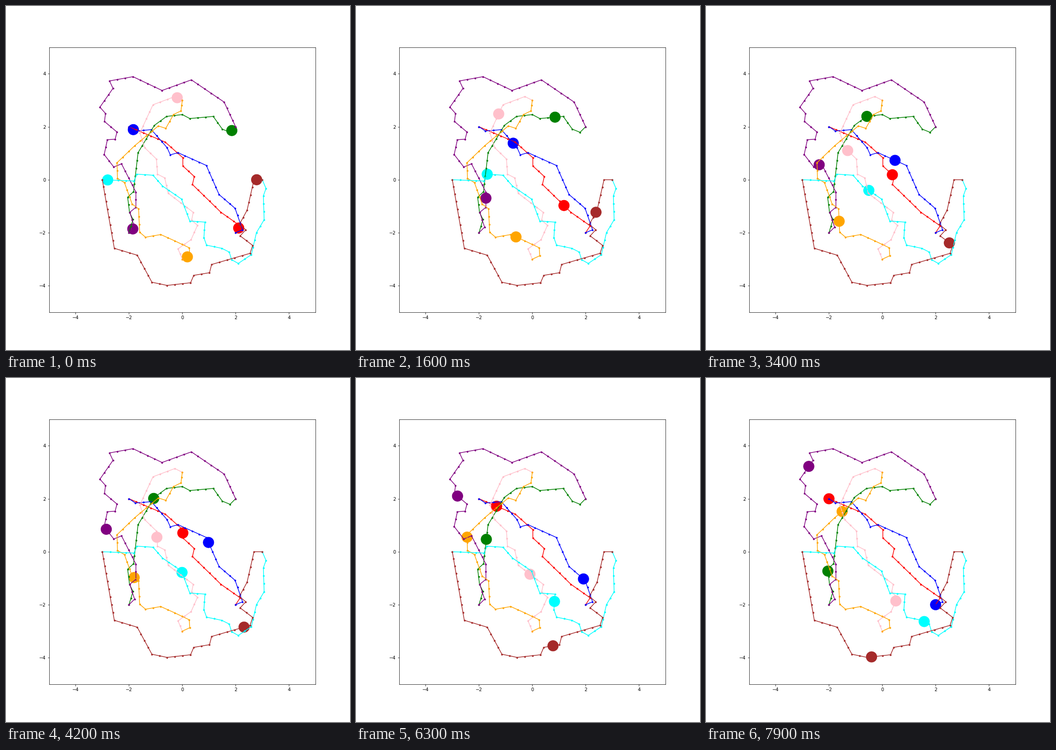
A matplotlib script for the animation above (8 s loop, 748 by 748 pixels).

```python
import numpy as np
import matplotlib.pyplot as plt
from matplotlib.animation import FuncAnimation
from matplotlib.patches import Circle

STAGE, DPI = 748, 72
FRAMES, INTERVAL = 80, 100
STEP = 0.3    # spacing of the waypoints
START = 0.68  # waypoints already passed when the loop begins

fig, ax = plt.subplots(figsize=(STAGE / DPI, STAGE / DPI), dpi=DPI)
ax.set_xlim(-5, 5)
ax.set_ylim(-5, 5)
robots = []


def waypoints(turns):
    """Split every leg between two turns into steps of about STEP."""
    turns = np.array(turns, float)
    route = [turns[:1]]
    for a, b in zip(turns, turns[1:]):
        count = max(1, int(np.ceil(np.hypot(*(b - a)) / STEP - 0.25)))
        route.append(np.linspace(a, b, count + 1)[1:])
    return np.concatenate(route).T


def add_robot(color, speed, turns):
    """Draw a route and its robot; speed is in waypoints per frame."""
    x, y = waypoints(turns)
    ax.plot(x, y, ".-", color=color)
    body = ax.add_patch(Circle((x[0], y[0]), 0.2, color=color))
    robots.append((body, speed, x, y))


add_robot("red", 0.284, [
    (2, -2), (2.17, -1.74), (1.45, -1.23), (0.38, -0.18), (0.45, 0.12),
    (0.02, 0.52), (0.02, 0.83), (-0.64, 1.42), (-2, 2)])

add_robot("blue", 0.286, [
    (-2, 2), (-1.76, 1.84), (-1.16, 1.89), (-0.57, 1.21), (-0.45, 0.94),
    (-0.16, 1.02), (0.9, 0.54), (1.38, -0.56), (1.98, -1.08),
    (2.26, -1.89), (2, -2)])

add_robot("green", 0.273, [
    (2, 2), (1.79, 1.79), (1.5, 1.91), (1.16, 2.39), (0.28, 2.31),
    (0, 2.46), (-0.59, 2.39), (-1.05, 2.05), (-1.66, 1.02),
    (-1.83, -0.45), (-2.05, -0.66), (-1.98, -1.23), (-1.85, -1.5),
    (-2, -2)])

add_robot("purple", 0.283, [
    (-2, -2), (-1.79, -1.79), (-1.97, -1.23), (-1.74, -1.04),
    (-1.74, -0.47), (-2.28, 0.6), (-2.57, 0.48), (-2.93, 0.95),
    (-2.81, 1.51), (-2.52, 1.53), (-2.45, 1.8), (-2.92, 2.2),
    (-2.88, 2.5), (-3.09, 2.74), (-2.6, 3.45), (-2.73, 3.73),
    (-1.85, 3.89), (-0.76, 3.37), (0.34, 3.77), (1.57, 2.93), (2, 2)])

add_robot("pink", 0.289, [
    (0, 3), (-0.28, 3.14), (-1.1, 2.83), (-1.59, 1.77), (-1.41, 1.21),
    (-0.97, 0.78), (-0.93, 0.21), (-0.66, 0.07), (-0.53, -0.51),
    (0.41, -1.23), (0.35, -1.53), (0.57, -1.72), (0.33, -2.26),
    (-0.16, -2.61), (0, -3)])

add_robot("orange", 0.286, [
    (0, -3), (0.28, -2.87), (0.26, -2.57), (-0.28, -2.31),
    (-0.81, -2.07), (-1.38, -2.17), (-1.6, -1.98), (-1.64, -1.1),
    (-1.88, -0.92), (-2.17, -0.11), (-2.43, 0.05), (-2.45, 0.64),
    (-1.79, 1.28), (-0.9, 2.03), (-0.62, 1.94), (-0.33, 2.46),
    (-0.05, 2.6), (0, 3)])

add_robot("cyan", 0.274, [
    (-3, 0), (-1.81, -0.05), (-1.71, 0.21), (-1.1, 0.17),
    (-0.74, -0.24), (-0.03, -0.73), (0.28, -1.56), (0.85, -1.6),
    (0.81, -2.19), (0.91, -2.47), (1.48, -2.59), (1.76, -2.73),
    (1.85, -3.02), (2.1, -3.16), (2.59, -2.83), (2.78, -2),
    (3.07, -1.51), (3.04, -0.61), (3.14, -0.33), (3, 0)])

add_robot("brown", 0.288, [
    (3, 0), (2.69, 0), (2.43, -1.15), (2.14, -1.69), (2.38, -1.89),
    (2.17, -2.12), (2.64, -2.48), (2.54, -2.78), (1.1, -3.2),
    (1.02, -3.51), (0.43, -3.61), (0.31, -3.89), (-0.57, -3.99),
    (-1.14, -3.87), (-1.69, -2.85), (-2.55, -2.59), (-2.86, -0.82),
    (-3, 0)])


def update(frame):
    for body, speed, x, y in robots:
        steps = np.arange(len(x))
        at = START + speed * frame
        body.center = np.interp(at, steps, x), np.interp(at, steps, y)
    return [robot[0] for robot in robots]


anim = FuncAnimation(fig, update, frames=FRAMES, interval=INTERVAL,
                     repeat=True, repeat_delay=0)
plt.show()
```
